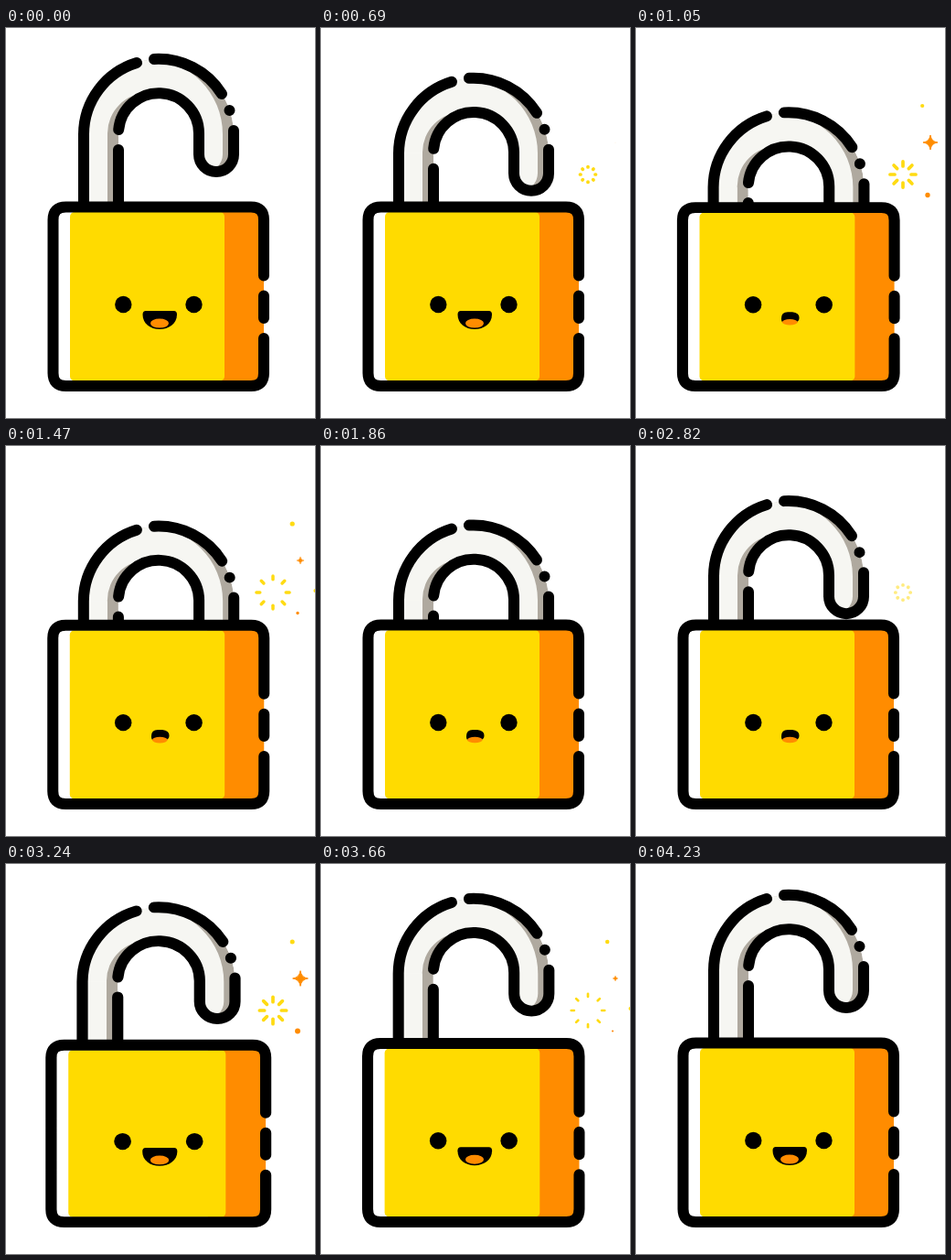
An HTML page for the animation above (4260 ms loop, 338 px wide and 426 px high).

```html
<!DOCTYPE html>
<html lang="en">
<head>
<meta charset="utf-8">
<title>Padlock</title>
<style>
  html, body { margin: 0; width: 100%; height: 100%; overflow: hidden; background: #fff; }
  svg { display: block; width: 338px; height: 426px; }
  .ink { fill: none; stroke: #000; stroke-width: 12; stroke-linecap: round; stroke-linejoin: round; }
  #lock { transform-origin: 167px 397px; }
  #rays { stroke: #ffdb12; stroke-linecap: round; }
  .bit { transform-box: fill-box; transform-origin: center; transform: scale(0); }
</style>
</head>
<body>
<svg viewBox="0 0 338 426">
  <defs>
    <path id="band" d="M85 250V116A82 82 0 0 1 249 116V138A19 19 0 0 1 211 138V115A44 44 0 0 0 123 115V250Z"/>
    <clipPath id="inBand"><use href="#band"/></clipPath>
  </defs>

  <g id="lock">
    <g id="shackle">
      <g clip-path="url(#inBand)">
        <use href="#band" fill="#afa99f"/>
        <use href="#band" x="-12" fill="#f6f6f2"/>
        <rect x="85" y="116" width="26" height="134" fill="#f6f6f2"/>
      </g>
      <path class="ink" d="M85 250V116A82 82 0 0 1 143 38M162 34A82 82 0 0 1 236 72M244.500 90h.01M249 112V138A19 19 0 0 1 211 138V115A44 44 0 0 0 123.200 111M123 133V250"/>
    </g>

    <rect x="51.500" y="195.500" width="230.500" height="195.500" rx="14" fill="#fff"/>
    <path d="M220 195.500H268Q282 195.500 282 209.500V377Q282 391 268 391H220Z" fill="#ff8c00"/>
    <rect x="70" y="201" width="169" height="184.500" rx="5" fill="#ffdb00"/>
    <path class="ink" d="M282 270.500V209.500Q282 195.500 268 195.500H65.500Q51.500 195.500 51.500 209.500V377Q51.500 391 65.500 391H268Q282 391 282 377V339M282 292.500V317"/>

    <circle cx="128.300" cy="302" r="9.200"/>
    <circle cx="205.500" cy="302" r="9.200"/>
    <path id="mouth"/>
    <path id="tongue" fill="#ff8c00"/>
  </g>

  <g id="rays" transform="translate(292 160)"></g>
  <path class="bit" data-born="20" data-life="940" fill="#ff8c00" stroke="#ff8c00" stroke-linejoin="round"
        d="M322 116.500Q323 124 330.500 125Q323 126 322 133.500Q321 126 313.500 125Q321 124 322 116.500Z"/>
  <circle class="bit" data-born="160" data-life="780" cx="319" cy="182.500" r="3.300" fill="#ff8c00"/>
  <circle class="bit" data-born="200" data-life="860" cx="313.200" cy="85" r="3.300" fill="#ffdb12"/>
  <circle class="bit" data-born="460" data-life="620" cx="338.500" cy="158" r="2.200" fill="#ffdb12"/>
</svg>
<script>
const HALF = 2130;   // one closing or one opening
const HIT = 900;     // when the shackle reaches its stop
const SWING = 440;   // period of the wobble
const TRAVEL = 52.5; // shackle distance between open and closed
const BURST = 1000;

const $ = id => document.getElementById(id);
const clamp = v => Math.min(1, Math.max(0, v));
const smooth = v => v * v * (3 - 2 * v);

// Blends two strings number by number.
function mix(a, b, k) {
  const ends = b.match(/[\d.]+/g);
  return a.replace(/[\d.]+/g, n => +n + (ends.shift() - n) * k);
}

const happy = {
  mouth: 'M153 309L183.5 309Q187 309 187 313C187 323 178 329 168 329C158 329 149.5 323 149.5 313Q149.5 309 153 309Z',
  tongue: 'M158 322.6A10 5 0 0 1 178 322.6A10 5 0 0 1 158 322.6Z'
};
const worried = {
  mouth: 'M166 310L171 310Q178.5 311 178.5 316C178.5 322 174 321 168 321C162 321 159 323 159 317Q159 310 166 310Z',
  tongue: 'M160 321A8.3 3.3 0 0 1 176.6 321A8.3 3.3 0 0 1 160 321Z'
};

const rays = Array.from({ length: 8 }, (_, i) => {
  const ray = document.createElementNS('http://www.w3.org/2000/svg', 'line');
  ray.setAttribute('transform', `rotate(${i * 45})`);
  return $('rays').appendChild(ray);
});
const bits = [...document.querySelectorAll('.bit')];

function drawLock(t, opening) {
  const since = t - HIT;
  const fade = (1 - since / (HALF - HIT)) ** (opening ? 2 : 4);
  const phase = 2 * Math.PI / SWING;
  const rush = (t / HIT) ** 3.5;

  let y;
  if (opening) y = since < 0 ? TRAVEL - (TRAVEL + 14) * rush : -14 * fade * Math.cos(phase * since);
  else y = since < 0 ? TRAVEL * rush : TRAVEL + 10 * fade * Math.sin(phase * since);
  $('shackle').style.transform = `translateY(${y}px)`;

  // The body starts to give shortly before the stop.
  const give = since < -60 ? 0 : fade * Math.sin(phase * (since + 60));
  const squash = give * (opening ? -.04 : .067);
  $('lock').style.transform = `scale(${1 + squash}, ${1 - .6 * squash})`;

  const turn = smooth(clamp(since / 150));
  const worry = opening ? 1 - turn : turn;
  for (const id of ['mouth', 'tongue']) {
    $(id).setAttribute('d', mix(happy[id], worried[id], worry));
  }
}

function drawBurst(age) {
  const p = clamp(age / BURST);
  const tip = 8 + 10.5 * Math.sin(p * Math.PI / 2);
  const tail = 8 + 10.5 * p ** 2.5;
  $('rays').style.opacity = clamp(age / 30);
  $('rays').style.strokeWidth = 3.7 * clamp(5 * (1 - p));
  for (const ray of rays) {
    ray.setAttribute('x1', tail);
    ray.setAttribute('x2', tip);
  }
  for (const bit of bits) {
    const k = clamp((age - bit.dataset.born) / bit.dataset.life);
    bit.style.transform = `scale(${Math.sin(Math.PI * k)})`;
  }
}

function draw(now) {
  const t = now % HALF;
  const opening = now % (2 * HALF) >= HALF;
  drawLock(t, opening);
  drawBurst(t - (opening ? 675 : 660));
}

const start = performance.now();
function tick() {
  draw(performance.now() - start);
  requestAnimationFrame(tick);
}
tick();
</script>
</body>
</html>
```
